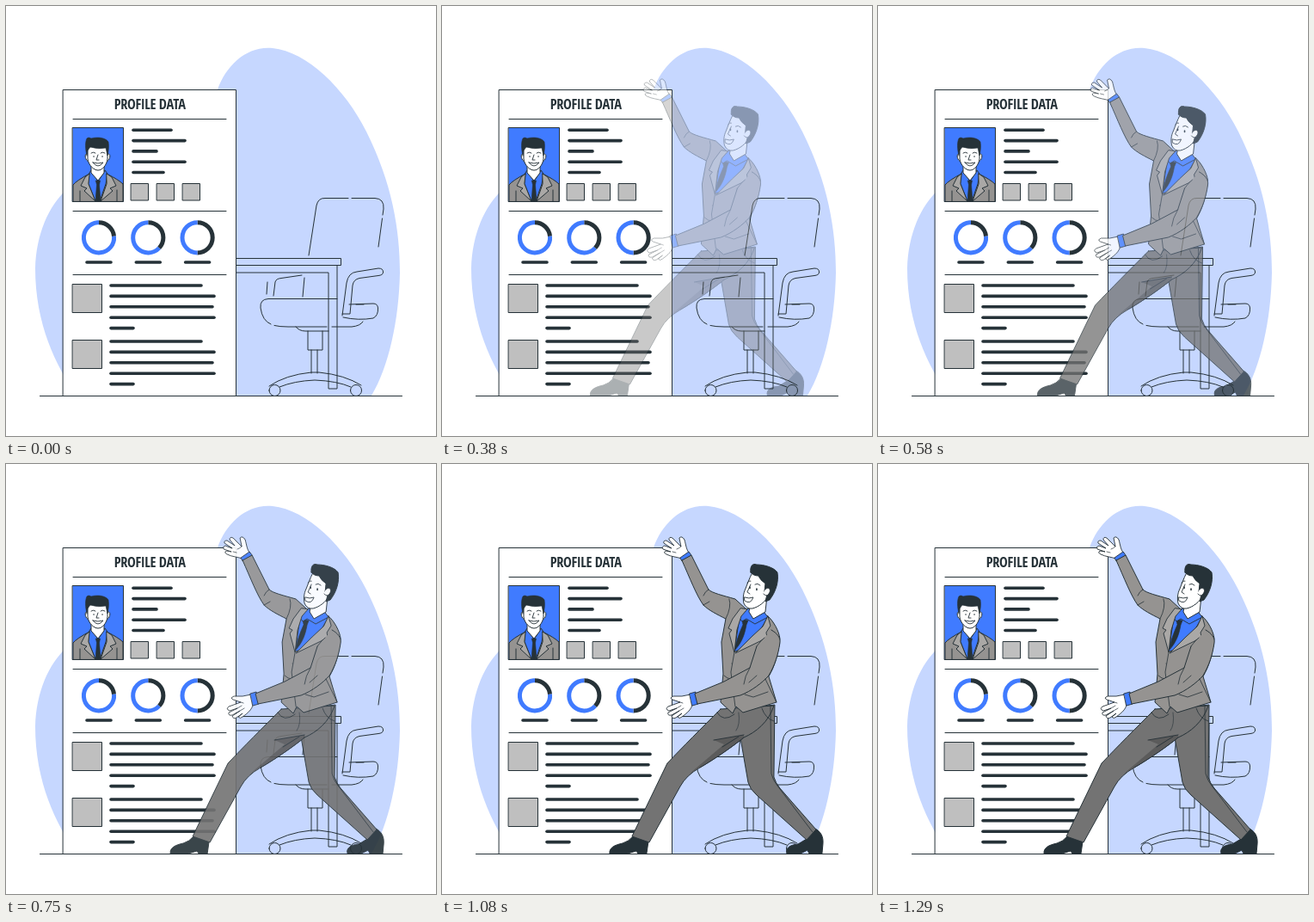
An HTML page with a canvas for the animation above (1.33 s loop, 500 by 500 pixels).

```html
<!DOCTYPE html>
<html lang="en">
<head>
<meta charset="utf-8">
<title>Profile data</title>
<style>
  html, body { margin: 0; width: 100%; height: 100%; overflow: hidden; background: #fff; }
  canvas { position: absolute; left: 0; top: 0; width: 500px; height: 500px; }
</style>
</head>
<body>
<canvas id="scene" width="500" height="500"></canvas>
<canvas id="man" width="500" height="500"></canvas>
<script>
const INK = '#263238', BLUE = '#407bff', PALE = '#c6d7ff', WHITE = '#fff';
const JACKET = '#959391', LAPEL = '#aaa8a6', TROUSERS = '#737373', SHADE = '#5b5b5b', BOX = '#bfbfbf';
const LOOP = 1330, STEP = 1000 / 24;

const manCanvas = document.getElementById('man');
const scene = document.getElementById('scene').getContext('2d');
const man = manCanvas.getContext('2d');
for (const c of [scene, man]) c.lineJoin = c.lineCap = 'round';

function shape(c, d, fill, width = 1, color = INK) {
  const path = new Path2D(d);
  if (fill) { c.fillStyle = fill; c.fill(path); }
  if (width) { c.lineWidth = width; c.strokeStyle = color; c.stroke(path); }
}
const box = (x, y, w, h, fill) => shape(scene, `M${x},${y}h${w}v${h}h${-w}z`, fill);
const bar = (x1, x2, y) => shape(scene, `M${x1},${y}H${x2}`, null, 3.6);

function drawBackground() {
  shape(scene, `M246,97C256,69 280,46 310,49C350,53 394,96 419,146C449,206 458,260 458,310
    C457,365 445,420 425,453H82C58,418 34,370 34,305C35,265 50,232 70,214C140,160 225,150 246,97Z`, PALE, 0);
  shape(scene, 'M39.5,453.5H460.5');
}

function drawFurniture() {
  [
    // backrest
    'M352,290L361,232Q363,223 371,223.5H398M402,223.5H429Q440,224 439,236L438,243M437.500,247L433,280',
    // seat
    'M385,340.500H305Q295,341 296,351Q298,366 308,370M312,371.500Q318,373 328,373H373M379,373H402Q412,372 415,367',
    'M399,347L427,346Q432,346 432.500,351Q433,360 427,363Q410,366 392,362M407,347H416',
    // armrests
    'M391,360L396,322Q398,310 408,309L433,305Q439,305 438.500,310Q438,313 433,313.500L411,316.500Q404,318 403,325L400,358H391',
    'M311,337L313,321Q314,317 320,316.500L344,313M303,335L304,321M347,316L345,338',
    // stem and base
    'M337,373Q341,378 348,378H375M351,378V400H368V378M355,400V427M362,400V427',
    'M306,442Q325,429 355,426H364Q394,429 413,441M318,443Q335,436 359,435Q385,436 401,443'
  ].forEach(d => shape(scene, d));
  for (const x of [312.5, 407]) {
    shape(scene, `M${x - 6.5},447a6.500,6.500 0 1 1 13,0a6.500,6.500 0 1 1 -13,0Z`, PALE);
  }
  shape(scene, 'M267,293.500H389.500V301.500H267M267,310H375V445H385V301.500');
}

function drawPortrait() {
  box(77.5, 141.5, 59, 86, BLUE);
  shape(scene, 'M78,227V208Q82,203 97,195L107,204L117,195Q131,202 136,207V227Z', JACKET);
  shape(scene, 'M97,194L99,191L107,204L115,191L118,195L116,207L109,227H104L96,207Z', BLUE);
  shape(scene, 'M99,186V194L107,203L114,194V186Z', WHITE);
  shape(scene, 'M104.500,203H109.500L108.500,208L110,227H104L105.500,208Z', INK, .6);
  shape(scene, 'M97,195L92,199L87,209L94,212L91,215L104,227L96,207Z', LAPEL);
  shape(scene, 'M117,195L123,199L128,209L121,212L124,215L110,227L117,207Z', LAPEL);
  shape(scene, 'M95,172C91,170 91,179 96,181M118,172C122,170 122,179 117,181', WHITE);
  shape(scene, 'M95,164V178C96,185 102,191 107,191C112,191 117,185 118,178V164Z', WHITE);
  shape(scene, `M94,174C92,166 92,158 94,154Q96,152 99,154C106,152 116,153 119,158
    C120,164 119,169 118,174L116,165Q107,167 98,164L95,168Z`, INK, .6);
  shape(scene, 'M99,171Q101,169 104,171M110,171Q112,169 115,171M107,173L105,179H108', null, .9);
  shape(scene, 'M101,182Q107,184 113,182Q107,190 101,182Z', WHITE, .9);
  shape(scene, 'M102,175h.1M112,175h.1', null, 1.5);
  shape(scene, 'M86,227V215M129,227V214');
}

function drawTitle() {
  const families = '"Open Sans Condensed", "Roboto Condensed", "Open Sans", sans-serif';
  let size = 19.6;
  const setFont = () => {
    scene.font = `bold extra-condensed ${size}px ${families}`;
    scene.letterSpacing = '-0.4px';
    return scene.measureText('PROFILE DATA').width;
  };
  while (setFont() > 83 && size > 12) size -= .2;
  scene.textAlign = 'center';
  scene.textBaseline = 'alphabetic';
  scene.fillStyle = INK;
  scene.fillText('PROFILE DATA', 167.3, 114.5 + size * .357);
}

function drawRing(x, part) {
  const start = -Math.PI / 2, mid = start + part * 2 * Math.PI;
  scene.lineCap = 'butt';
  scene.lineWidth = 5;
  for (const [color, from, to] of [[INK, start, mid], [BLUE, mid, start + 2 * Math.PI]]) {
    scene.strokeStyle = color;
    scene.beginPath();
    scene.arc(x, 269.3, 17.6, from, to);
    scene.stroke();
  }
  scene.lineCap = 'round';
  bar(x - 14, x + 14, 298);
}

function drawPage() {
  box(66.5, 97.5, 201, 356, WHITE);
  drawTitle();
  for (const y of [131.5, 238.5, 312.5]) shape(scene, `M78,${y}H256`);
  drawPortrait();
  [192, 208, 175, 208, 183].forEach((end, i) => bar(148, end, 144.3 + i * 12.3));
  for (const x of [145.5, 175.5, 205.5]) box(x, 206.5, 20, 19.5, BOX);
  [.235, .37, .5].forEach((part, i) => drawRing(108 + i * 57.3, part));
  for (const y of [325, 390]) {
    box(77.5, y - 1.5, 34, 33, BOX);
    [227, 242, 240, 242, 148].forEach((end, i) => bar(122, end, y + i * 12.4));
  }
}

function drawMan() {
  const part = (d, fill, width) => shape(man, d, fill, width);

  // shoes and legs
  part('M401,453C399,447 404,443 414,442L424,436L434,424C440,427 444,433 443,442L442,453H427L425,449L417,453Z', INK);
  part('M195,453C194,446 201,443 210,441Q217,439 222,433L240,439L238,453H228L226,450L216,453Z', INK);
  part('M343,285L387,280L386,364Q388,371 393,377L435,425L424,437L366,385Q358,378 356,370L346,312Z', TROUSERS);
  part('M324,285L386,281C380,300 365,312 351,318C340,327 319,342 300,353Q284,362 277,375L241,440L221,433L262,348C280,329 302,307 324,285Z', TROUSERS);
  part('M351,315L316,321L328,326L288,360L300,353C319,342 340,327 351,318Z', SHADE, 0);
  part('M351,315L316,321M345,317L326,329M351,318C340,327 319,342 300,353', null, .9);
  part('M382,282L383,360Q385,368 390,374L431,428M372,284Q376,296 386,299M320,289Q327,301 340,291', null, .8);
  part('M345,289Q347,303 342,310', null, .6);

  // raised hand and cuff
  part(`M288,104C284,100 284,95 282,88Q279,83 276,86L278,96L268,86Q264,84 264,88L270,95L261,89Q257,89 258,92
    L267,98L259,95Q255,96 257,99L266,102L260,101Q257,103 261,105C267,108 273,108 279,110Z`, WHITE, .9);
  part('M273,99Q276,98 278,96M268,102L272,103', null, .7);
  part('M277,109L287,102L290,106L280,113Z', BLUE, .9);

  // jacket with raised arm
  part(`M279,112L290,106L310,146C314,150 327,153 341,157L354,169L379,177C385,182 392,194 393,203
    C391,222 387,235 380,247L389,277L350,289L342,282L338,290L324,277L327,244L325,207L330,180
    C320,175 310,170 304,164C296,153 288,132 279,112Z`, JACKET);
  part('M334,157Q337,166 330,180M310,146Q306,148 304,153M304,164L311,160', null, .8);

  // shirt, tie and lapels
  part('M355,169L346,178L340,218L347,216L372,190L379,178L372,171Z', BLUE);
  part('M349,181L356,182L354,187C352,198 349,207 341,216C342,206 346,196 350,187Z', INK, .7);
  part('M355,169L345,178L349,183L354,180L364,186L379,178L372,169', BLUE, .9);
  part('M347,168L338,180L333,191L337,193L334,197L340,219L343,193L348,177L355,169Z', LAPEL, .9);
  part('M379,177L382,188L377,196L378,201L370,206L341,220L360,201L373,189Z', LAPEL, .9);
  part('M340,219L336,242L341,282M328,246Q332,250 336,250M337,232h.1', null, .8);

  // head
  part('M359,160L357,172L362,180L376,172L378,154Z', WHITE);
  part('M361,126C357,134 355,140 353,145C350,151 350,157 351,162Q354,169 361,168C369,166 376,160 379,154L382,144L376,126Z', WHITE);
  part(`M359,126C358,119 361,115 366,117C374,117 386,120 390,126C392,137 388,149 381,158
    L376,160L378,152L375,149L376,139Q370,135 368,130Q362,130 359,126Z`, INK);
  part('M375,147C379,141 384,146 380,151Q377,155 374,151', WHITE, .9);
  part('M359,140L355,149L358,151M355,138Q357,135 359,136M364,140Q367,138 370,141', null, .9);
  part('M358,143v1.500M366,145v1.500', null, 1.6);
  part('M352,155Q357,157 362,155Q359,164 352,159Z', WHITE, .9);

  // lower arm and hand
  part(`M289,268L279,270L269,270Q264,272 268,274L277,277L263,282Q259,285 264,287L273,284L263,289Q262,293 267,292
    L276,287L267,293Q268,297 272,295L279,290L274,294Q276,297 279,294C286,289 290,285 291,280Z`, WHITE, .9);
  part('M273,284L278,281M276,287L281,284M277,277L280,278', null, .7);
  part('M288,267L295,265L298,279L291,281Z', BLUE, .9);
  part(`M383,193C390,197 394,202 393,208C391,222 387,234 380,246C373,254 360,264 347,269L297,279L294,267
    L328,253L358,237L366,212`, JACKET);
  part('M358,237Q352,247 351,256M366,246L357,254M366,212Q372,204 375,202', null, .8);
  part('M376,250L389,277M352,268L362,271L379,265', null, .8);
}

// cubic-bezier(.25, .1, .25, 1)
function ease(p) {
  if (p <= 0) return 0;
  if (p >= 1) return 1;
  let low = 0, high = 1, s = .5;
  for (let i = 0; i < 24; i++) {
    s = (low + high) / 2;
    const x = .75 * s * (1 - s) + s ** 3;
    if (x < p) low = s; else high = s;
  }
  return .3 * s * (1 - s) ** 2 + 3 * s * s * (1 - s) + s ** 3;
}

function render(now) {
  const time = Math.floor((now % LOOP + 5) / STEP) * STEP;
  const drift = Math.max(0, (time - 1125) / 167);
  const x = -31 * (1 - ease((time - 195) / 950)) - 2 * drift ** 2;
  man.clearRect(0, 0, 500, 500);
  man.save();
  man.translate(x, 0);
  drawMan();
  man.restore();
  manCanvas.style.opacity = ease((time - 150) / 950);
}

drawBackground();
drawFurniture();
drawPage();

const begin = performance.now();
function tick() {
  render(performance.now() - begin);
  requestAnimationFrame(tick);
}
tick();
</script>
</body>
</html>
```
